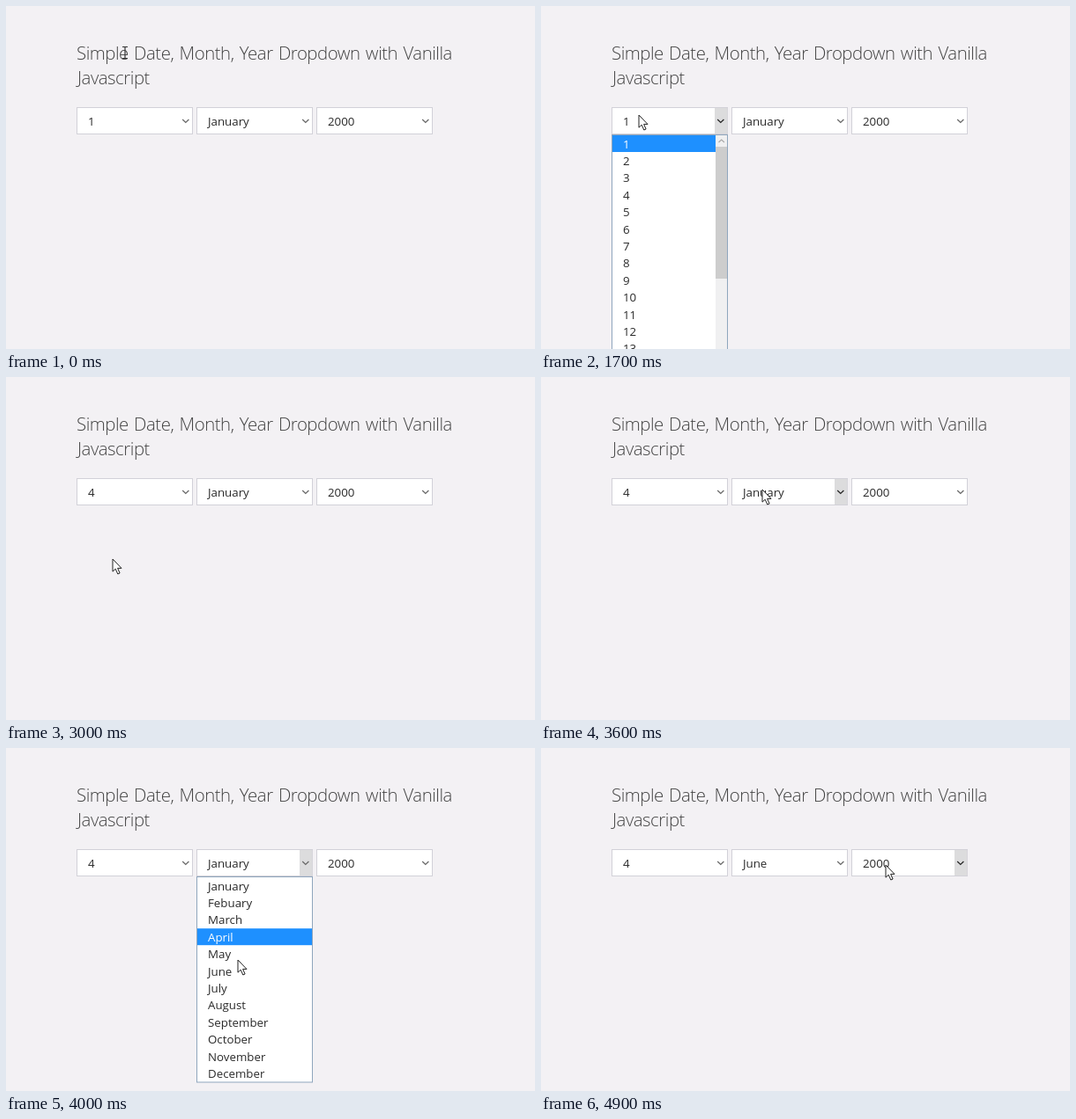
These frames come from a looping animation (600 px wide and 390 px high, 5 s). An HTML page:

```html
<!DOCTYPE html>
<html lang="en">
<head>
<meta charset="utf-8">
<title>Dropdown demo</title>
<style>
  html, body { margin: 0; width: 100%; height: 100%; overflow: hidden; background: #f3f1f4; }
  svg { display: block; width: 600px; height: 390px; font: 13.3px "Open Sans", "Noto Sans", sans-serif; fill: #2a2a2a; }
  .title { font-size: 20.4px; font-weight: 300; letter-spacing: -.48px; word-spacing: 1.5px; fill: #444; }
  .line { fill: none; stroke-width: 1.2; }
</style>
</head>
<body>
<svg id="stage" viewBox="0 0 600 390"></svg>
<script>
const LOOP = 5000, TICK = 100, ROW = 19.4, TOP = 147;
const days = Array.from({ length: 31 }, (_, i) => i + 1);
const months = ["January", "Febuary", "March", "April", "May", "June", "July",
  "August", "September", "October", "November", "December"];
const menus = [
  { items: days, from: 1700, to: 3000, pick: 3, scrolls: true },
  { items: months, from: 3700, to: 4300, pick: 5 },
  { items: [2000], from: LOOP }
];

// cursor stops: time, x, y
const stops = [
  [0, 135, 53], [1000, 135, 53], [1100, 129, 77], [1500, 111, 124], [1900, 111, 124],
  [2300, 120, 224], [2500, 119, 209], [3000, 121, 207], [3600, 251, 128], [3800, 251, 128],
  [4000, 263, 241], [4100, 265, 258], [4500, 266, 252], [4900, 391, 133], [LOOP, 391, 133]
];

function cursorAt(t) {
  const i = stops.findIndex(s => s[0] > t);
  const [t0, x0, y0] = stops[i - 1], [t1, x1, y1] = stops[i];
  const k = (t - t0) / (t1 - t0);
  return [x0 + (x1 - x0) * k, y0 + (y1 - y0) * k];
}

const rect = (x, y, w, h, fill, stroke = "none") =>
  `<rect x="${x}" y="${y}" width="${w}" height="${h}" fill="${fill}" stroke="${stroke}"/>`;
const text = (x, y, s, extra = "") => `<text x="${x}" y="${y}" ${extra}>${s}</text>`;
const path = (d, stroke) => `<path class="line" d="${d}" stroke="${stroke}"/>`;

function box(x, value, open, over) {
  return rect(x + .5, 115.5, 131, 30, "#fff", "#d2d1d8") +
    (open || over ? rect(x + 117, 116, 14.5, 29, "#dcdcdd") : "") +
    path(`M${x + 120.2} 129l3.6 3.5 3.6-3.5`, over ? "#222" : "#666") +
    text(x + 13, 136, value);
}

function list(x, { items, scrolls }, active) {
  let out = rect(x + .5, 146.5, 131, scrolls ? 260 : 233.5, "#fff", "#8fa6bd") +
    rect(x + 1, TOP + active * ROW, scrolls ? 117 : 130, 19, "#1e90ff");
  items.forEach((item, i) => {
    out += text(x + 13, TOP + i * ROW + 14.6, item, i === active ? 'fill="#fff"' : "");
  });
  if (scrolls) out += rect(x + 118, TOP, 13, 250, "#f0f0f1") +
    rect(x + 118, 160, 13, 150, "#cdcdcd") +
    path(`M${x + 121.5} 155l3.2-3 3.2 3`, "#aaa");
  return out;
}

function cursor(x, y) {
  if (y < 85) return path(`M${x - 3} ${y - 6.5}h6m-3 0v13m-3 0h6`, "#333");
  return `<path d="M${x} ${y}v14.2l3.2-3 2.6 5.8 2.3-1-2.5-5.6h4.4z" fill="#fff" stroke="#222"/>`;
}

function scene(t) {
  const [x, y] = cursorAt(t);
  let out = text(80, 61, "Simple Date, Month, Year Dropdown with Vanilla", 'class="title"') +
    text(81, 89, "Javascript", 'class="title"');
  menus.forEach((menu, i) => {
    const left = 80 + i * 136;
    const open = t >= menu.from && t < menu.to;
    const over = x > left && x < left + 132 && y > 115 && y < 146;
    out += box(left, menu.items[t >= menu.to ? menu.pick : 0], open, over);
    if (open) {
      // the highlight trails the cursor slightly
      const row = Math.floor((cursorAt(t - 50)[1] - TOP) / ROW);
      out += list(left, menu, Math.max(0, row));
    }
  });
  return out + cursor(x, y);
}

const stage = document.getElementById("stage");
let shown;
function frame() {
  const t = Math.floor(performance.now() % LOOP / TICK) * TICK;
  if (t !== shown) stage.innerHTML = scene(shown = t);
  requestAnimationFrame(frame);
}
frame();
</script>
</body>
</html>
```
